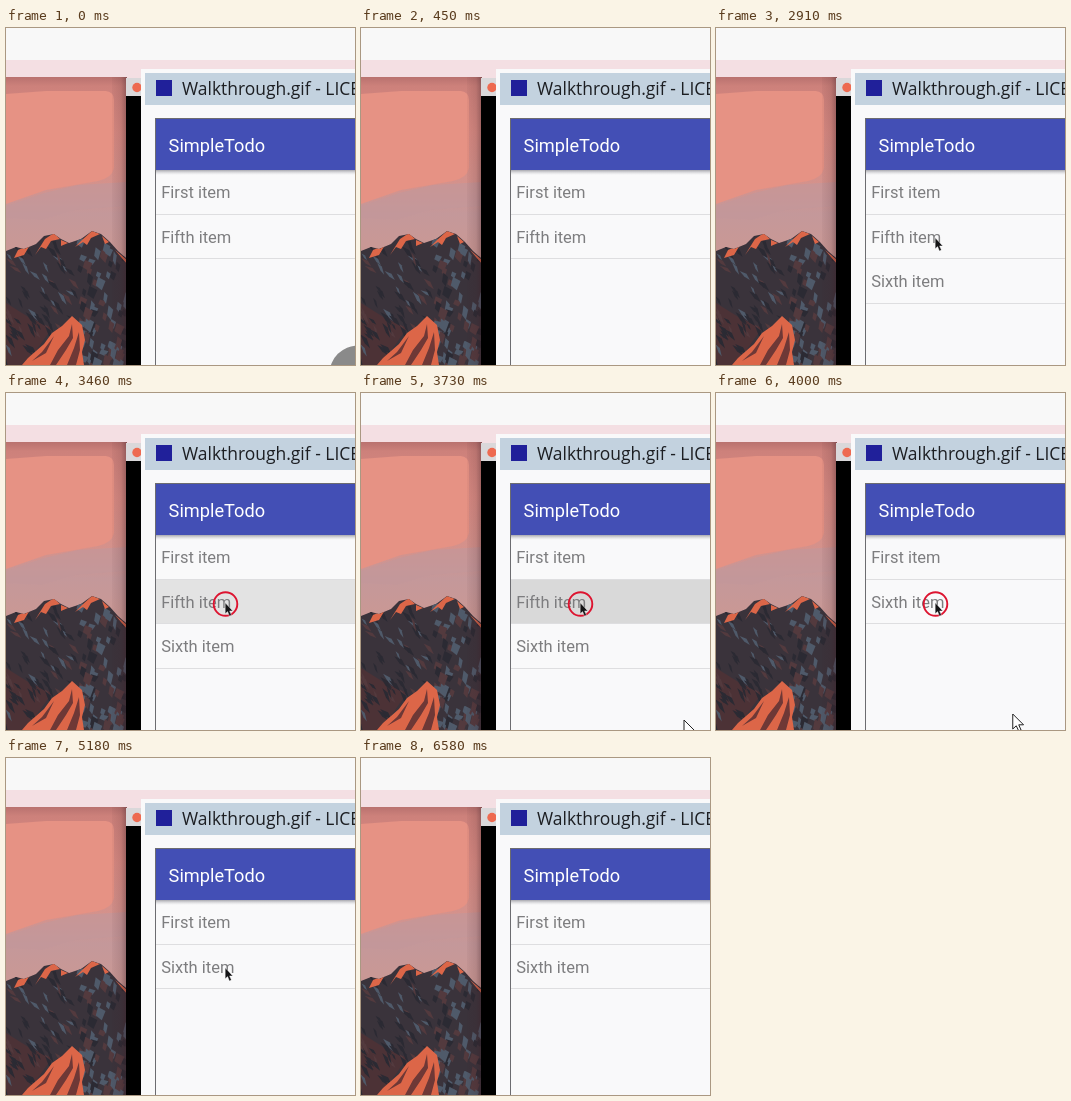
These frames come from a looping animation (349x337 px, 8000 ms). An HTML page:

```html
<!DOCTYPE html>
<html lang="en">
<head>
<meta charset="utf-8">
<title>Todo walkthrough</title>
<style>
  html, body { margin: 0; width: 100%; height: 100%; overflow: hidden; background: #f8f8f8; }
  svg { display: block; width: 349px; height: 337px; }
  .app { font-family: Roboto, sans-serif; }
  .item { font-size: 16.5px; fill: #7d7d7f; }
  .line { fill: #dedee0; }
</style>
</head>
<body>
<svg viewBox="0 0 349 337" xmlns="http://www.w3.org/2000/svg">
  <defs>
    <linearGradient id="sky" x2="0" y2="1">
      <stop offset="0" stop-color="#b9726f"/>
      <stop offset=".05" stop-color="#cd817b"/>
      <stop offset=".3" stop-color="#d98b83"/>
      <stop offset=".6" stop-color="#d4928c"/>
      <stop offset=".75" stop-color="#c4989a"/>
      <stop offset="1" stop-color="#cb9893"/>
    </linearGradient>
    <linearGradient id="edge">
      <stop offset="0" stop-color="#402028" stop-opacity=".04"/>
      <stop offset=".6" stop-color="#402028" stop-opacity=".14"/>
      <stop offset="1" stop-color="#402028" stop-opacity=".42"/>
    </linearGradient>
    <linearGradient id="drop" x2="0" y2="1">
      <stop offset="0" stop-color="#8c8c94" stop-opacity=".75"/>
      <stop offset="1" stop-color="#c8c8cc" stop-opacity="0"/>
    </linearGradient>
    <clipPath id="range">
      <path d="M0 223L10 219 18 221 30 216 38 208 48 206 55 211 63 215 75 211 86 203 95 206 104 214 112 223 121 231V337H0Z"/>
    </clipPath>
  </defs>

  <rect width="349" height="337" fill="#f8f8f8"/>
  <rect y="32" width="349" height="18" fill="#f4dfe3"/>

  <!-- desktop -->
  <g>
    <rect y="49" width="121" height="182" fill="url(#sky)"/>
    <path d="M0 66L40 63H100Q108 64 108 72V140Q106 150 92 153L40 162 0 176Z" fill="#e69284"/>
    <path d="M0 178L38 165 72 157 121 154V178L70 182 36 192 0 190Z" fill="#c4989a" opacity=".7"/>
    <g clip-path="url(#range)">
      <rect y="200" width="121" height="137" fill="#3a333b"/>
      <path d="M0 275L24 290 46 300 20 337H0Z" fill="#4c3236"/>
      <g id="rocks"></g>
      <g fill="#dc6648">
        <path d="M29 227L39 211 48 205 54 211 45 213 40 221 35 219ZM55 212L62 215 55 218ZM12 222L24 217 18 227 8 230Z"/>
        <path d="M69 219L76 212 86 203 94 206 85 210 81 217 77 214ZM96 208L103 214 99 216ZM109 222L121 232V236Z"/>
        <path d="M66 288L56 298 46 305 38 316 22 330 16 337H78L76 324 79 312 76 297Z"/>
      </g>
      <path d="M66 296L63 308 52 322 44 337H50L60 322 67 310ZM73 304L68 320 61 337H70L74 322ZM48 308L36 324 26 333 40 325Z" fill="#6e3836"/>
    </g>
    <rect x="106" y="49" width="15" height="288" fill="url(#edge)"/>
  </g>

  <!-- window behind -->
  <rect x="120" y="50" width="20" height="18" fill="#dad8da"/>
  <rect x="120" y="68" width="16" height="269" fill="#000"/>
  <circle cx="131" cy="59.5" r="4.7" fill="#ee6a50"/>

  <!-- recorder window -->
  <rect x="135" y="41" width="214" height="296" fill="#f9f9fa"/>
  <rect x="139" y="45" width="210" height="32" fill="#c3d2df"/>
  <rect x="150" y="52" width="16" height="16" fill="#20209a"/>
  <text x="176" y="67" font-family="Open Sans, Noto Sans, sans-serif" font-size="17.45" fill="#1c1e22">Walkthrough.gif - LICEcap</text>

  <!-- app -->
  <g class="app">
    <rect x="149" y="90" width="200" height="247" fill="#6c6c70"/>
    <rect x="150" y="91" width="199" height="246" fill="#f9f9fa"/>
    <rect x="150" y="142" width="199" height="5" fill="url(#drop)"/>
    <rect x="150" y="91" width="199" height="51" fill="#434fb5"/>
    <text x="162.6" y="123.7" font-size="18.2" fill="#fff">SimpleTodo</text>
    <rect id="press" x="150" y="187" width="199" height="44" fill="#d9d9d9"/>
    <g id="rows"></g>
    <rect id="patch" x="299" y="292" width="50" height="45" fill="#fcfcfd"/>
    <circle id="touch" cx="352" cy="346" r="28.5" fill="#8a8a8a"/>
  </g>

  <circle id="ring" cx="219.5" cy="211" fill="none" stroke="#dd1430" stroke-width="1.9"/>
  <path id="dark" d="M0 0V11L2.4 8.8 4.2 13.2 6.2 12.3 4.4 8.1H7.6Z" fill="#141416" stroke="#fff" stroke-opacity=".55" stroke-width=".7"/>
  <path id="light" d="M0 0V15L3.5 11.8 6 17 8.3 16 6 10.8H10.8Z" fill="#fff" stroke="#222" stroke-width="1"/>
</svg>
<script>
const LOOP = 8000, TICK = 90;
const $ = id => document.getElementById(id);
const [press, patch, touch, ring, dark, light] =
  ["press", "patch", "touch", "ring", "dark", "light"].map($);

let seed = 7;
const rand = (a, b) => {
  seed = (seed * 16807) % 2147483647;
  return a + (b - a) * seed / 2147483647;
};

// Slanted shards: slate to the right, brown and near-black elsewhere.
function shard() {
  const x = rand(-4, 121), y = rand(208, 337);
  const slate = x > 72 ? 0.5 : 0.2, pick = rand(0, 1);
  const fill = pick < slate ? "#4f5a6a" : pick < 0.72 ? "#2b2a33" : "#533a3e";
  const lean = x > 66 ? -1 : 1, w = rand(3, 8), h = rand(6, 15);
  return `<path fill="${fill}" d="M${x} ${y}l${w} ${h * 0.3} ${lean * w * 0.5} ${h * 0.7} ${-w * 0.8} ${-h * 0.35}Z"/>`;
}
$("rocks").innerHTML = Array.from({ length: 170 }, shard).join("");

const rowMarkup = (name, i) => {
  const top = 142 + i * 44.6;
  return `<text class="item" x="155.2" y="${top + 28.2}">${name}</text>
    <rect class="line" x="150" y="${Math.floor(top + 44)}" width="199" height="1"/>`;
};

let shown = "";
function showRows(names) {
  const key = names.join();
  if (key === shown) return;
  shown = key;
  $("rows").innerHTML = names.map(rowMarkup).join("");
}

// Progress 0..1 in n ticks; the first tick lands at start.
const steps = (t, start, n) =>
  Math.min(n, Math.max(0, Math.floor((t - start) / TICK) + 1)) / n;
const mix = (a, b, p) => a + (b - a) * p;
const ease = p => p * p * p * (p * (6 * p - 15) + 10);
const show = (el, opacity) => el.setAttribute("opacity", Number(opacity));
const place = (el, x, y) => el.setAttribute("transform", `translate(${x} ${y})`);

// time, x, y
const lightPath = [
  [3550, 345, 333], [3730, 323, 327], [4090, 288, 319],
  [4360, 269, 318], [4540, 265, 318], [4730, 265, 318], [5180, 253, 340]
];

function along(path, t) {
  const i = Math.max(1, path.findIndex(k => k[0] >= t));
  const a = path[i - 1], b = path[i];
  const p = (t - a[0]) / (b[0] - a[0]);
  return [mix(a[1], b[1], p), mix(a[2], b[2], p)];
}

function drawDark(t) {
  const enter = steps(t, 1080, 5), move = ease(steps(t, 1620, 5));
  const p = (enter - 0.2) / 0.8;
  const x = mix(150, 178.6, p) + 40.6 * move;
  const y = mix(241, 188.4, p) + 21.4 * move;
  place(dark, x, y);
  show(dark, enter ? 1 - steps(t, 6490, 2) : 0);
}

function drawLight(t) {
  const on = t >= 3550 && t < 5180;
  show(light, on);
  if (!on) return;
  const base = t < 4820 ? 3550 : 4820;
  const held = base + Math.floor((t - base) / TICK) * TICK;
  place(light, ...along(lightPath, t < 4820 ? held : held + TICK));
}

function draw(t) {
  const removed = t >= 3910;
  showRows(["First item", ...(removed ? [] : ["Fifth item"]), ...(t >= 540 ? ["Sixth item"] : [])]);

  show(touch, 1 - steps(t, 90, 4));
  show(patch, t >= 360 && t < 540);
  show(press, removed ? 0 : steps(t, 3370, 3));

  show(ring, t >= 3370 && t < 4540);
  ring.setAttribute("r", 11.8 + 9.4 * steps(t, 4180, 4));

  drawDark(t);
  drawLight(t);
}

function frame() {
  draw(performance.now() % LOOP);
  requestAnimationFrame(frame);
}
frame();
</script>
</body>
</html>
```
